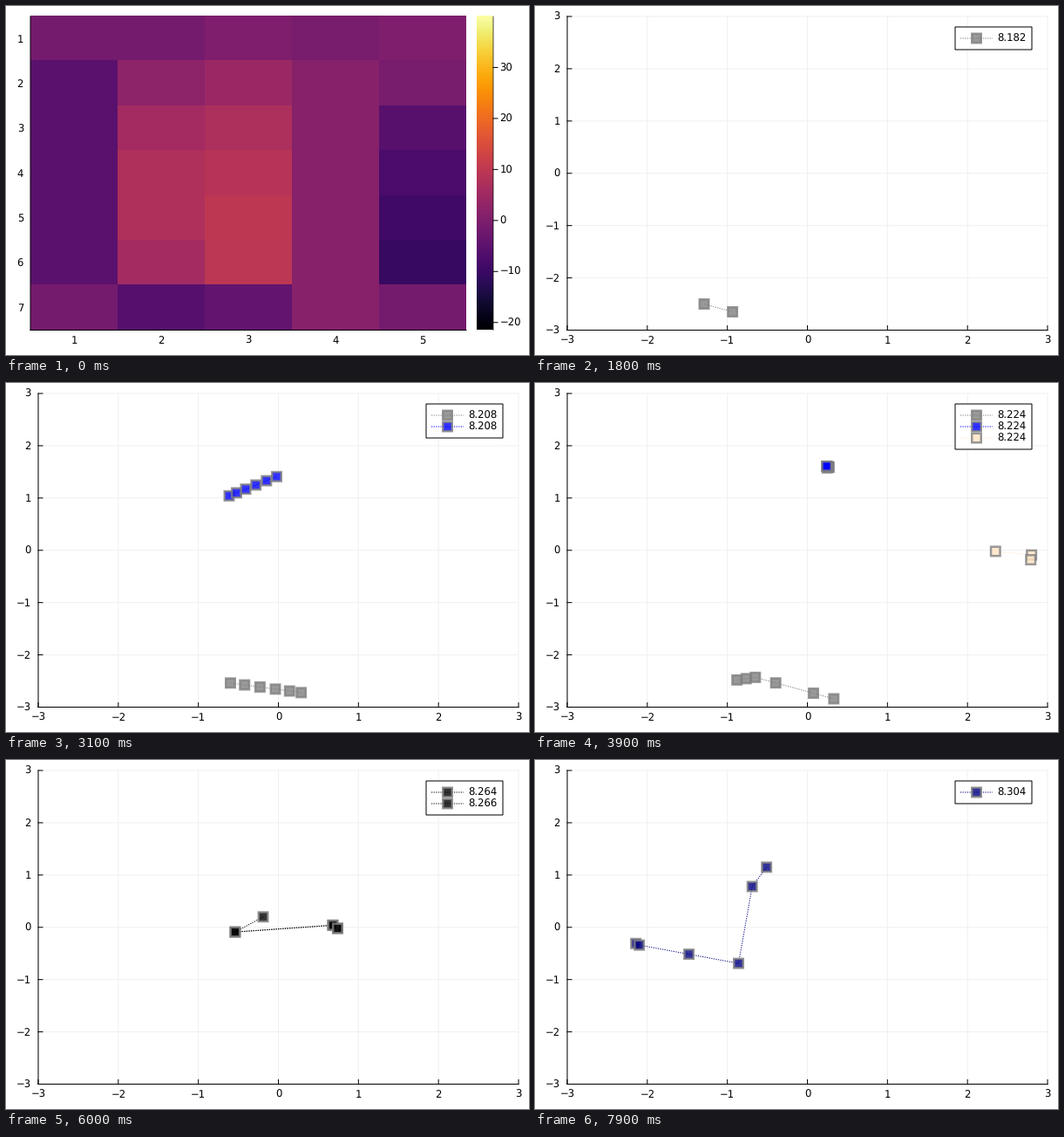
A matplotlib script for the animation above (8 s loop, 600 by 400 pixels).

```python
import numpy as np
import matplotlib.pyplot as plt
from matplotlib.animation import FuncAnimation
from matplotlib.colors import to_rgba
from matplotlib.patches import Rectangle

# Lines and text sit on fractional pixels
plt.rcParams.update({"path.snap": False, "text.hinting": "none",
                     "font.family": "DejaVu Sans"})

W, H, DPI = 600, 400, 100
PT = 72 / DPI                      # points per pixel
FRAMES, INTERVAL = 80, 100
FONT = 11.6 * PT
TAIL = 6                           # positions kept behind each head
SCATTER_START = 7
LEFT, RIGHT, TOP, BOTTOM = 37, 588, 12, 371.5
V_MIN, V_MAX = -21.5, 40


def heat_values():
    """Cold side columns around a warm ridge, with calm edge rows."""
    i = np.arange(5)
    inner = np.column_stack([
        np.full(5, -5.6),
        7.4 - 0.85 * (i - 2.5) ** 2,
        9.6 - 0.45 * (i - 3.4) ** 2,
        np.full(5, 1.2),
        -1 - 9.5 * np.sqrt(i / 4),
    ])
    return np.vstack([[-1.5, -1.5, 0, -0.9, 0], inner,
                      [-1.5, -6, -4, 1.2, -1.5]])


class Track:
    """A point easing between keys (frame, x, y[, bow of the leg]).

    lag delays the time shown in the legend.
    """

    def __init__(self, color, *keys, lag=0):
        self.color, self.keys, self.lag = color, keys, lag
        self.start, self.end = keys[0][0], keys[-1][0]

    def alive(self, n):
        return self.start <= n <= self.end

    def at(self, n):
        for (t0, x0, y0, *_), (t1, x1, y1, *bow) in zip(self.keys,
                                                        self.keys[1:]):
            if n <= t1:
                break
        u = (n - t0) / (t1 - t0)
        s = u * u * (3 - 2 * u)
        arch = 4 * s * (1 - s) * sum(bow)
        return x0 + (x1 - x0) * s, y0 + (y1 - y0) * s + arch

    def tail(self, n):
        first = max(self.start, n - TAIL + 1)
        return np.transpose([self.at(k) for k in range(first, n + 1)])

    def label(self, n):
        time = 8.16 + 0.002 * (n - SCATTER_START - self.lag)
        return f"{time:.3f}".rstrip("0")


HOPS = [(57, -.19, .2), (58, -.54, -.09), (59, .68, .04), (60, .74, -.02),
        (65, -.4, .6)]

TRACKS = [
    Track("cyan", (7, 1.645, -1.81), (8, 1.6, -1.74)),
    Track("gray", (17, -1.29, -2.5), (19, -.58, -2.8), (24, .42, -2.75, -.13),
          (34, -.88, -2.48), (36, -.65, -2.43), (39, .33, -2.84),
          (44, .6, -2.7)),
    Track("blue", (21, -.79, -.75), (22, -.7, .89), (24, -.7, .99),
          (35, .27, 1.59), (39, .24, 1.61), (41, .24, 1.65)),
    Track("tan", (19, 2.13, -.33), (22, 1.41, -.38, -.06), (24, 1.73, -.05),
          (30, 2.3, .3)),
    Track("navy", (26, -2.78, .4), (27, -2.6, .5)),
    Track("bisque", (37, 2.35, -.02), (38, 2.8, -.09), (39, 2.79, -.18),
          (41, 2.6, -.3)),
    Track("black", (45, -2.11, -.6), (47, -.12, .75), (52, .02, .75, .08),
          (55, .1, .6)),
    Track("black", *HOPS[:-1], lag=1),
    Track("black", *HOPS[1:]),
    Track("navy", (66, -1, .5), (70, -2.52, -.05), (75, -2.1, -.34),
          (77, -.86, -.69), (78, -.69, .78), (79, -.51, 1.15)),
]

fig = plt.figure(figsize=(W / DPI, H / DPI), dpi=DPI, facecolor="white")
ax = fig.add_axes([0, 0, 1, 1])


def px(x):
    return (LEFT + RIGHT) / 2 + (RIGHT - LEFT) / 6 * x


def py(y):
    return (TOP + BOTTOM) / 2 - (BOTTOM - TOP) / 6 * y


def line(x0, y0, x1, y1, color="black", width=1.0):
    ax.plot([x0, x1], [y0, y1], color=color, lw=width * PT)


def text(x, y, s, align="center"):
    label = str(s).replace("-", "\u2212")
    ax.text(x, y + 4, label, ha=align, va="baseline", size=FONT, zorder=5)


def series(x, y, color, marks, z=3):
    """Dotted line through x, y with square markers at marks."""
    parts = ax.plot(x, y, color=color, lw=PT, ls=(0, (1.2, 1.4)),
                    dash_capstyle="butt", zorder=z)
    size = 10.5
    for mx, my in marks:
        parts.append(ax.add_patch(Rectangle(
            (mx - size / 2, my - size / 2), size, size, lw=2.5 * PT,
            fc=to_rgba(color, 0.8), ec=to_rgba("gray", 0.8), zorder=z)))
    return parts


def draw_heatmap():
    values = heat_values()
    rows, cols = values.shape
    left, right = 28, 528
    style = dict(cmap="inferno", aspect="auto", interpolation="nearest")
    ax.imshow(values, vmin=V_MIN, vmax=V_MAX,
              extent=(left, right, BOTTOM, TOP), **style)
    ax.imshow(np.linspace(1, 0, 256)[:, None],
              extent=(540, 558.5, BOTTOM, TOP), **style)
    line(left, TOP, left, BOTTOM)
    line(left, BOTTOM, right, BOTTOM)
    for c in range(cols):
        text(left + (c + .5) * (right - left) / cols, 383, c + 1)
    for r in range(rows):
        text(20, TOP + (r + .5) * (BOTTOM - TOP) / rows, r + 1, "right")
    line(559, TOP, 559, BOTTOM, width=.7)
    for v in range(-20, 31, 10):
        y = TOP + (V_MAX - v) / (V_MAX - V_MIN) * (BOTTOM - TOP)
        line(559, y, 564, y)
        text(566.5, y, v, "left")


def draw_axes():
    for v in range(-3, 4):
        line(px(v), TOP, px(v), BOTTOM, "#f0f0f0")
        line(LEFT, py(v), RIGHT, py(v), "#f0f0f0")
    line(LEFT, TOP, LEFT, BOTTOM)
    line(LEFT, BOTTOM, RIGHT, BOTTOM)
    for v in range(-3, 4):
        line(px(v), BOTTOM, px(v), BOTTOM - 5)
        line(LEFT, py(v), LEFT + 5, py(v))
        text(px(v), 383, v)
        text(29, py(v), v, "right")


def draw_legend(tracks, n):
    labels = [t.label(n) for t in tracks]
    right, top, pitch = 570, 24, 13
    left = right - 48 - 8 * max(map(len, labels))
    ax.add_patch(Rectangle((left, top), right - left,
                           pitch * (len(labels) + 1),
                           fc="white", ec="black", lw=PT, zorder=4))
    for i, (track, label) in enumerate(zip(tracks, labels), 1):
        y = top + pitch * i
        series([left + 6, left + 43], [y, y], track.color,
               [(left + 24.5, y)], z=5)
        text(left + 48.5, y, label, "left")


def draw_tracks(n):
    tracks = [t for t in TRACKS if t.alive(n)]
    frame = Rectangle((LEFT, TOP), RIGHT - LEFT, BOTTOM - TOP,
                      transform=ax.transData)
    for track in tracks:
        x, y = track.tail(n)
        x, y = px(x), py(y)
        for part in series(x, y, track.color, zip(x, y)):
            part.set_clip_path(frame)
    if tracks:
        draw_legend(tracks, n)


def draw(n):
    ax.clear()
    ax.axis("off")
    if n < SCATTER_START:
        draw_heatmap()
    else:
        draw_axes()
        draw_tracks(n)
    ax.set_xlim(0, W)
    ax.set_ylim(H, 0)
    return []


anim = FuncAnimation(fig, draw, frames=FRAMES, interval=INTERVAL,
                     init_func=lambda: [], repeat=True, repeat_delay=0,
                     cache_frame_data=False)
plt.show()
```
